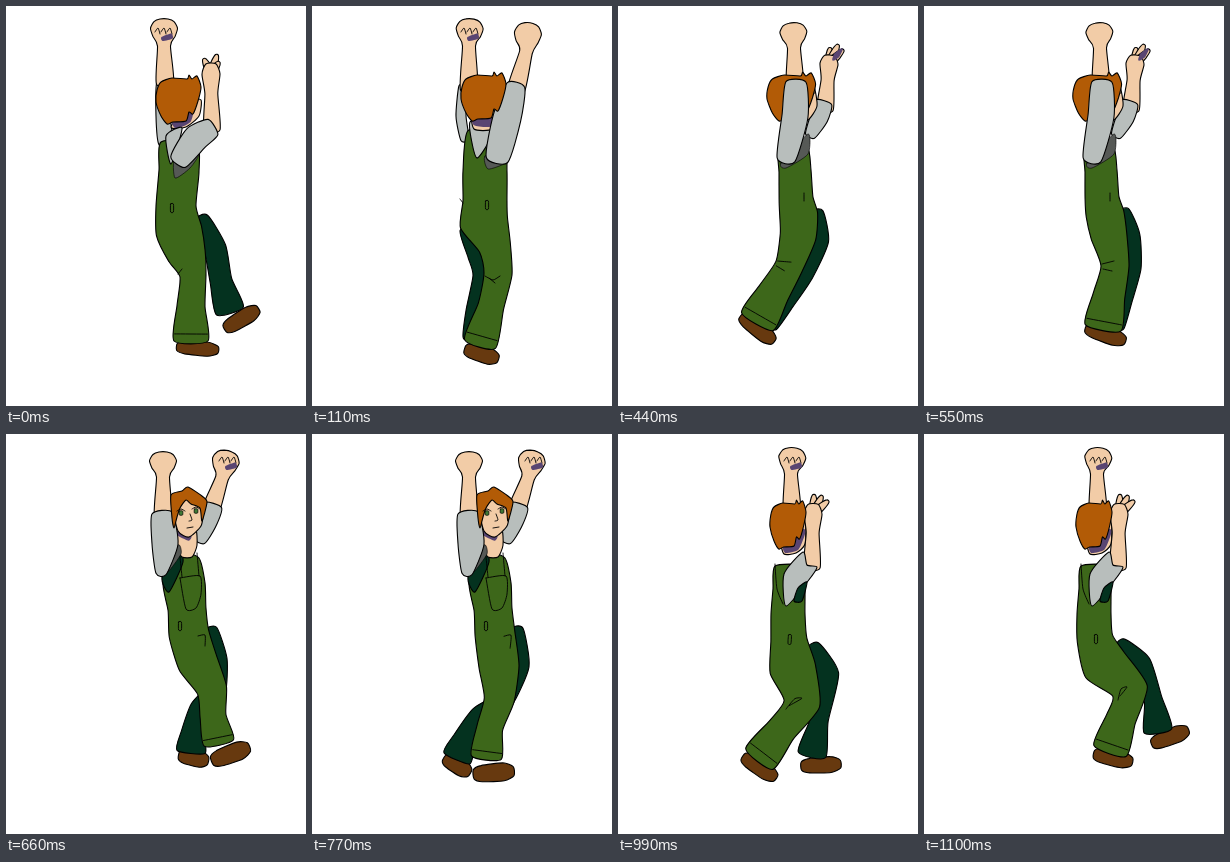
Write an HTML page that moves like this. It is 300 px wide and 400 px high and loops after 1.21 s.

```html
<!DOCTYPE html>
<html lang="en">
<head>
<meta charset="utf-8">
<title>Swinging climber</title>
<style>
html, body { margin: 0; width: 100%; height: 100%; overflow: hidden; background: #fff; }
svg { display: block; width: 100%; height: 100%; }
path { stroke: #000; stroke-width: 1.1; stroke-linejoin: round; stroke-linecap: round; }
.skin { fill: #f2cca7; }
.hair { fill: #b25b06; }
.shirt { fill: #b8bebc; }
.denim { fill: #3d671a; }
.dark { fill: #04321f; }
.shoe { fill: #67390f; }
.sole { fill: #aa7a4c; }
.shade { fill: #565956; stroke-width: .6; }
.violet { fill: #594572; stroke: none; }
.iris { fill: #3f7a35; stroke-width: .7; }
.line { fill: none; stroke-width: .9; }
</style>
</head>
<body>
<svg id="stage" viewBox="0 0 300 400"></svg>
<script>
const STEP = 110;
const HIP = 200;
let swing = { degrees: 0, hipX: 0, stretch: 1 };

const mix = (a, b, t) => a + (b - a) * t;

function chunk(values, size) {
  const rows = [];
  for (let i = 0; i < values.length; i += size) rows.push(values.slice(i, i + size));
  return rows;
}

// Swings everything below the hip, easing in along the thigh.
function place([x, y]) {
  if (!swing.degrees || y < HIP) return [x, y];
  const angle = swing.degrees * Math.min(1, (y - HIP) / 60) * Math.PI / 180;
  const dx = x - swing.hipX, dy = (y - HIP) * swing.stretch;
  return [swing.hipX + dx * Math.cos(angle) - dy * Math.sin(angle),
          HIP + dx * Math.sin(angle) + dy * Math.cos(angle)];
}

// Softly rounded curve through the points.
function curve(kind, points, closed = true) {
  const n = points.length, round = v => v.toFixed(1);
  const at = i => points[closed ? (i + n) % n : Math.max(0, Math.min(n - 1, i))];
  const handle = (i, sign) => at(i).map((v, k) => round(v + sign * (at(i + 1)[k] - at(i - 1)[k]) / 9));
  let d = 'M' + at(0).map(round);
  for (let i = 0; i < (closed ? n : n - 1); i++) {
    d += `C${handle(i, 1)} ${handle(i + 1, -1)} ${at(i + 1).map(round)}`;
  }
  return `<path class="${kind}" d="${d}${closed ? 'Z' : ''}"/>`;
}

const shape = (kind, ...xy) => curve(kind, chunk(xy, 2).map(place));
const line = (...xy) => curve('line', chunk(xy, 2).map(place), false);

// Both edges of a spine given as x, y, half width.
function edges(values) {
  const joints = chunk(values, 3);
  const spine = joints.map(place);
  const side = sign => spine.map(([x, y], i) => {
    const a = spine[Math.max(0, i - 1)], b = spine[Math.min(spine.length - 1, i + 1)];
    const dx = b[0] - a[0], dy = b[1] - a[1], w = sign * joints[i][2] / Math.hypot(dx, dy);
    return [x - dy * w, y + dx * w];
  });
  return [side(1), side(-1)];
}

function limb(kind, ...values) {
  const [left, right] = edges(values);
  return curve(kind, [...left, ...right.reverse()]);
}

function overalls(...values) {
  const cuff = edges(values).map(side => {
    const [a, b] = side.slice(-2);
    return [mix(a[0], b[0], .8), mix(a[1], b[1], .8)];
  });
  return limb('denim', ...values) + curve('line', cuff, false);
}

function knuckles(x, y) {
  const folds = [-6, 0, 6].map(k => line(x + k - 3, y + 13, x + k, y + 9, x + k + 2, y + 15));
  return folds.join('') + limb('violet', x - 2, y + 20, 2, x + 8, y + 17, 2.5);
}

function arm(x, y, wristX, wristY, tipX, tipY) {
  const hand = (t, w) => [mix(wristX, tipX, t), mix(wristY, tipY, t), w];
  return limb('skin', x, y, 8.5, ...hand(0, 6.5), ...hand(.35, 11), ...hand(.65, 13.5), ...hand(.9, 10), ...hand(1, 4));
}

function openArm(x, y, palmX, palmY, ...tips) {
  const fingers = chunk(tips, 2).map(([fx, fy]) =>
    limb('skin', palmX, palmY, 4, mix(palmX, fx, .6), mix(palmY, fy, .6), 3.5, fx, fy, 1.5));
  return fingers.join('') +
    limb('skin', x, y, 8, mix(x, palmX, .65), mix(y, palmY, .65), 6.5, palmX, palmY, 9, mix(x, palmX, 1.18), mix(y, palmY, 1.18), 5);
}

function shoe(x, y, toeX, toeY, w = 8) {
  const at = (t, scale) => [mix(x, toeX, t), mix(y, toeY, t), w * scale];
  return limb('shoe', ...at(0, .5), ...at(.2, .9), ...at(.75, 1), ...at(1, .5));
}

const pocket = (x, y) => limb('line', x, y, 1.4, x, y + 8, 1.4);
const neck = x => limb('skin', x, 104, 11, x, 123, 9) + limb('violet', x, 110, 11, x - 1, 120, 8);

function mop(x, y, wide = 1, tall = 1) {
  const outline = [0, 27, 1, 15, 5, 7, 16, 3, 31, 4, 33, 0, 36, 4, 41, 1, 45, 12, 42, 26,
    37, 39, 33, 37, 30, 46, 17, 47, 11, 49, 5, 41];
  return shape('hair', ...outline.map((v, i) => i % 2 ? y + v * tall : x + v * wide));
}

const eye = (x, y) => limb('iris', x, y - 2, 1.6, x, y + 2, 1.6) + line(x - 4, y - 2, x, y - 4, x + 4, y - 2);

function frontHead(dx) {
  const moved = (kind, ...xy) => shape(kind, ...xy.map((v, i) => i % 2 ? v : v + dx));
  return moved('skin', 167, 72, 175, 64, 190, 63, 197, 76, 195, 92, 183, 103, 172, 97) +
    moved('hair', 168, 94, 166, 84, 165, 61, 176, 57, 182, 53, 196, 62, 201, 68, 196, 87,
      194, 74, 185, 70, 180, 66, 174, 74, 171, 83);
}

// Each pose draws its parts from back to front.
const swingOut = () => [
  limb('shirt', 158, 76, 7, 157, 110, 7, 160, 138, 7),
  arm(159, 78, 158, 40, 158, 13), knuckles(158, 13),
  shoe(219, 323, 252, 303),
  limb('dark', 195, 212, 7, 209, 242, 11, 215, 275, 11, 224, 305, 14),
  shoe(171, 341, 212, 344, 7),
  shape('skin', 183, 95, 195, 94, 193, 110, 180, 121, 165, 121),
  limb('violet', 168, 119, 4, 180, 112, 6, 186, 96, 3),
  overalls(173, 136, 18, 173, 165, 20, 170, 200, 20, 173, 225, 23, 181, 250, 19, 187, 270, 13, 185, 300, 14, 185, 335, 17),
  shape('shirt', 160, 130, 165, 158, 176, 122),
  shape('shade', 169, 150, 193, 147, 184, 162, 169, 172),
  openArm(206, 124, 205, 68, 198, 53, 211, 49, 213, 56),
  limb('shirt', 207, 121, 9, 190, 132, 13, 172, 156, 9),
  mop(150, 69), pocket(166, 198), line(176, 263, 172, 268)
];

const hangBack = () => [
  limb('shirt', 151, 80, 4, 149, 110, 5, 153, 134, 4),
  arm(157, 84, 157, 40, 158, 13), knuckles(158, 13),
  limb('dark', 160, 222, 12, 165, 250, 9, 168, 270, 7, 160, 305, 6, 155, 332, 4),
  shoe(153, 343, 186, 353),
  overalls(174, 125, 18, 173, 165, 22, 173, 195, 22, 172, 217, 24, 183, 242, 16, 186, 268, 14, 179, 300, 13, 168, 338, 16),
  shape('shirt', 158, 116, 165, 152, 184, 120),
  neck(171),
  shape('shade', 173, 150, 197, 149, 194, 157, 176, 163),
  arm(204, 84, 214, 46, 217, 17),
  limb('shirt', 204, 79, 9, 195, 112, 14, 185, 154, 11),
  mop(149, 66), pocket(175, 195), line(148, 193, 151, 197),
  line(173, 270, 181, 274, 188, 270), line(177, 272, 183, 277)
];

const swingBack = () => [
  openArm(162, 82, 162, 65, 156, 49, 166, 44, 174, 57),
  limb('violet', 164, 56, 1, 166, 50, 3, 168, 46, 1),
  limb('shirt', 156, 112, 5, 152, 135, 7, 153, 151, 3),
  limb('shoe', 88, 293, 8, 93, 310, 9, 96, 323, 5),
  limb('sole', 79, 298, 4, 84, 315, 8, 92, 333, 6),
  limb('dark', 153, 228, 9, 132, 260, 9, 108, 276, 9, 91, 288, 7),
  limb('shoe', 104, 285, 10, 108, 300, 10, 104, 314, 5),
  limb('sole', 101, 290, 6, 99, 304, 10, 96, 321, 7),
  overalls(169, 132, 15, 173, 165, 18, 174, 195, 20, 170, 218, 23, 172, 238, 18, 158, 261, 15, 138, 273, 13, 111, 291, 16),
  shape('shirt', 156, 124, 163, 153, 178, 122),
  neck(168),
  shape('shade', 169, 156, 192, 141, 189, 152, 174, 165),
  arm(198, 80, 202, 46, 206, 17),
  limb('shirt', 198, 75, 9, 190, 110, 14, 178, 159, 9),
  mop(147, 65, .97, 1.18), pocket(170, 195)
];

const hangSide = () => [
  openArm(207, 104, 211, 58, 212, 42, 220, 39, 225, 44),
  limb('violet', 215, 54, 1, 219, 49, 3, 224, 43, 1),
  limb('shirt', 206, 96, 8, 201, 112, 9, 192, 130, 5),
  limb('dark', 198, 205, 7, 207, 230, 9, 209, 262, 8, 201, 295, 7, 196, 322, 4),
  shoe(162, 322, 201, 335),
  shape('skin', 182, 80, 195, 78, 199, 100, 190, 114, 182, 110),
  line(191, 87, 197, 87),
  overalls(175, 142, 14, 177, 165, 16, 178, 192, 17, 181, 208, 19, 185, 230, 18, 191, 260, 14, 185, 290, 16, 179, 322, 18),
  arm(177, 82, 176, 42, 175, 17),
  mop(149, 66, 1.08),
  shape('shade', 163, 157, 190, 128, 190, 148, 168, 162),
  limb('shirt', 178, 76, 10, 177, 110, 13, 168, 154, 9),
  line(186, 187, 186, 195), line(178, 258, 190, 255), line(179, 263, 188, 265)
];

const swingFront = () => [
  arm(204, 78, 216, 44, 222, 17), knuckles(222, 14),
  limb('shirt', 207, 71, 9, 201, 90, 9, 193, 107, 6),
  shoe(173, 321, 202, 327),
  limb('dark', 205, 195, 6, 213, 225, 8, 210, 255, 10, 195, 275, 11, 187, 300, 12, 185, 318, 14),
  shoe(206, 327, 243, 313, 9),
  overalls(183, 122, 10, 178, 148, 21, 181, 175, 19, 183, 200, 20, 192, 229, 20, 206, 256, 15, 207, 282, 13, 213, 309, 15),
  shape('dark', 156, 143, 171, 112, 177, 128, 163, 158),
  limb('skin', 179, 95, 10, 181, 112, 10, 181, 123, 5),
  limb('violet', 172, 98, 3, 184, 104, 3),
  shape('shade', 156, 139, 172, 111, 175, 120, 162, 138),
  arm(157, 84, 157, 43, 157, 18),
  limb('shirt', 156, 79, 10, 159, 110, 13, 155, 140, 5),
  frontHead(0), eye(175, 79), eye(190, 77), line(184, 80, 186, 86, 183, 87), line(181, 94, 187, 93),
  line(174, 144, 194, 142, 195, 160, 190, 174, 180, 175, 174, 144),
  line(174, 123, 176, 143), line(191, 119, 193, 142),
  pocket(174, 188), line(192, 202, 199, 201, 199, 212)
];

const swingRear = () => [
  arm(200, 77, 201, 43, 204, 16), knuckles(204, 13),
  limb('shirt', 200, 71, 8, 198, 90, 8, 190, 108, 5),
  shoe(138, 306, 149, 324),
  limb('dark', 191, 208, 5, 192, 245, 8, 188, 272, 10, 168, 288, 10, 149, 299, 10),
  shoe(100, 296, 117, 331, 9),
  overalls(184, 122, 8, 174, 152, 18, 173, 178, 19, 170, 205, 24, 170, 240, 19, 170, 266, 17, 138, 282, 13, 117, 300, 16),
  shape('dark', 158, 153, 177, 116, 180, 134, 170, 149),
  limb('skin', 179, 95, 9, 182, 112, 8, 183, 125, 4),
  openArm(160, 102, 147, 58, 132, 41, 139, 39, 148, 40, 156, 47),
  limb('shirt', 159, 98, 10, 163, 120, 13, 159, 152, 4),
  frontHead(-4), limb('violet', 172, 90, 2, 175, 80, 3),
  eye(184, 79), line(191, 76, 193, 77), line(189, 95, 194, 94),
  line(180, 124, 180, 152, 187, 176, 190, 168, 188, 122),
  pocket(173, 186), line(186, 204, 191, 210, 191, 220), line(154, 258, 157, 266)
];

const swingReach = () => [
  arm(174, 78, 173, 40, 175, 14), knuckles(175, 14),
  shoe(228, 310, 264, 296),
  limb('dark', 195, 210, 7, 216, 230, 11, 229, 265, 9, 234, 297, 14),
  shoe(170, 320, 208, 328),
  shape('skin', 164, 106, 186, 86, 187, 110, 178, 119, 166, 120),
  limb('violet', 166, 115, 4, 177, 112, 5, 185, 96, 3),
  overalls(171, 132, 14, 171, 155, 16, 170, 180, 17, 171, 205, 18, 181, 231, 23, 206, 257, 18, 197, 285, 15, 186, 317, 17),
  openArm(194, 134, 195, 80, 196, 61, 204, 62, 210, 67),
  shape('shirt', 166, 140, 185, 118, 189, 131, 199, 133, 190, 147, 168, 172),
  shape('dark', 176, 167, 180, 154, 189, 148, 184, 167),
  mop(152, 66, .8), line(157, 130, 159, 155, 165, 170),
  pocket(172, 201), line(194, 266, 197, 255, 203, 253, 196, 262)
];

const cel = (pose, degrees = 0, hipX = 175, stretch = 1) => {
  swing = { degrees, hipX, stretch };
  return pose().join('');
};

const cycle = [
  cel(swingOut), cel(hangBack), cel(hangBack, 17, 172),
  cel(swingBack), cel(hangSide, 19, 178), cel(hangSide),
  cel(swingFront), cel(swingFront, 18, 182, 1.1), cel(swingRear),
  cel(swingReach, 20, 174, 1.1), cel(swingReach)
];

const stage = document.getElementById('stage');
const start = performance.now();
let shown = -1;

function update(now) {
  const index = Math.floor(Math.max(0, now - start) / STEP) % cycle.length;
  if (index !== shown) stage.innerHTML = cycle[shown = index];
  requestAnimationFrame(update);
}
update(start);
</script>
</body>
</html>
```
